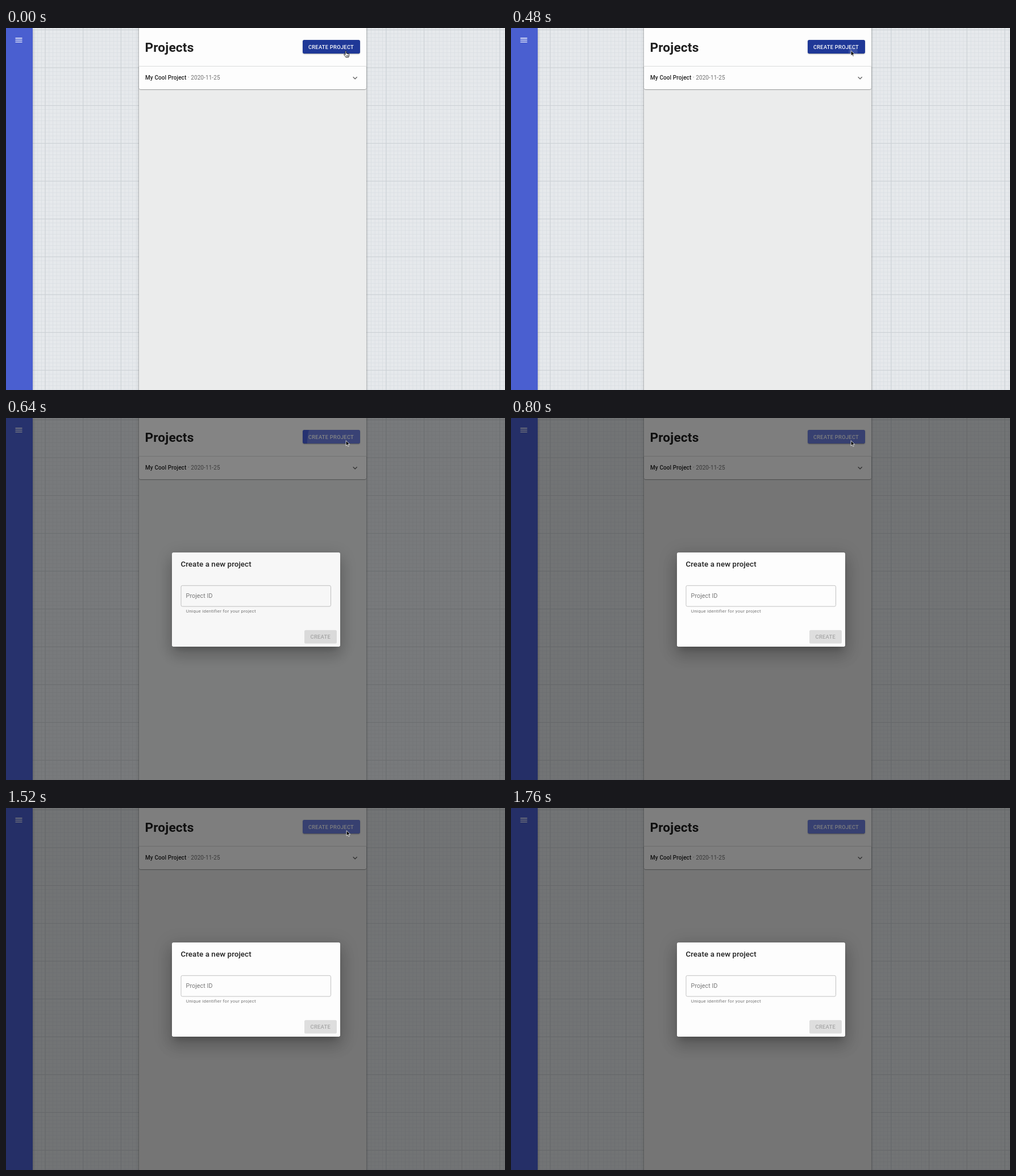
Recreate the animation shown at these times as an HTML page. Size 878 by 638 pixels, loop 2320 ms.

```html
<!DOCTYPE html>
<html lang="en">
<head>
<meta charset="utf-8">
<title>Create a project</title>
<style>
  html, body { margin: 0; width: 100%; height: 100%; overflow: hidden; }
  #stage {
    position: relative; width: 878px; height: 638px; overflow: hidden;
    background: #e6e9ec; font-family: Roboto, Arial, sans-serif;
  }
  #stage > *, #dialog > * { position: absolute; }
  svg { left: 0; top: 0; width: 878px; height: 638px; }
  text { white-space: pre; }
  .sidebar {
    left: 0; top: 0; width: 46.7px; height: 638px; background: #4a5fd0;
    box-shadow: 0 1.3px 2.7px -.7px #0003, 0 2.7px 3.3px #00000024, 0 .7px 6.7px #0000001f;
  }
  .panel {
    left: 234px; top: -4px; width: 399.5px; height: 650px; background: #ebecec;
    box-shadow: 0 1px 2px #0004, 0 1.3px 3px #00000024, 0 .7px 5.3px #0000001f;
  }
  .header, .row { left: 234px; width: 399.5px; background: #fdfdfd; }
  .header { top: 0; height: 67px; }
  .row {
    top: 67.5px; height: 40px; border-radius: 0 0 2.7px 2.7px;
    box-shadow: 0 1.3px .7px -.7px #0003, 0 .7px .7px #00000030, 0 .3px 2px #00000050;
  }
  #create {
    left: 521.5px; top: 21.3px; width: 101.3px; height: 24px; border-radius: 2.7px;
    box-shadow: 0 2px .7px -1.3px #0003, 0 1.3px 1.3px #00000024, 0 .7px 3.3px #0000001f;
  }
  #backdrop { inset: 0; background: #000; }
  #dialog { inset: 0; }
  .paper {
    left: 292px; top: 236.6px; width: 295.5px; height: 166.6px;
    border-radius: 2.7px; background: #fdfdfd;
    box-shadow: 0 7.3px 10px -4.7px #0003, 0 16px 25.3px 2px #00000024, 0 6px 30.7px 5.3px #0000001f;
  }
  .label { font-size: 10.67px; letter-spacing: .00938em; }
  .caps { font-size: 9.33px; font-weight: 500; letter-spacing: .02857em; }
</style>
</head>
<body>
<div id="stage">
  <svg>
    <defs>
      <pattern id="minor" x="2" y="3" width="6.667" height="6.667" patternUnits="userSpaceOnUse">
        <path d="M0 .35H6.667M.35 0V6.667" stroke="#d5dade" stroke-width=".7"/>
      </pattern>
      <pattern id="major" x="68.5" y="2.8" width="66.65" height="66.65" patternUnits="userSpaceOnUse">
        <path d="M0 .5H66.65M.5 0V66.65" stroke="#cbd0d4"/>
      </pattern>
    </defs>
    <rect width="878" height="638" fill="url(#minor)"/>
    <rect width="878" height="638" fill="url(#major)"/>
  </svg>
  <div class="sidebar"></div>
  <div class="panel"></div>
  <div class="header"></div>
  <div class="row"></div>
  <div id="create"></div>
  <svg>
    <clipPath id="buttonClip"><rect x="521.5" y="21.3" width="101.3" height="24" rx="2.7"/></clipPath>
    <g clip-path="url(#buttonClip)"><circle id="ripple" cx="602" cy="42" fill="#fff"/></g>
    <path transform="translate(14.5 13.3) scale(.6667)" fill="#fff"
      d="M3 18h18v-2H3zM3 13h18v-2H3zM3 8h18V6H3z"/>
    <text x="244.5" y="41.6" font-size="22.67" font-weight="700" letter-spacing=".17" fill="#1f1f1f">Projects</text>
    <text x="531.9" y="36.6" class="caps" fill="#fff">CREATE PROJECT</text>
    <text x="245" y="91.4" font-size="10" letter-spacing=".094" fill="#1f1f1f"><tspan font-weight="500">My Cool Project</tspan><tspan fill="#707070"> · 2020-11-25</tspan></text>
    <path transform="translate(606.2 80) scale(.6667)" fill="#666"
      d="M16.59 8.59 12 13.17 7.41 8.59 6 10l6 6 6-6z"/>
  </svg>
  <div id="backdrop"></div>
  <div id="dialog">
    <div class="paper"></div>
    <svg>
      <text x="307.4" y="262.3" font-size="13.33" font-weight="500" letter-spacing=".1" fill="#212121">Create a new project</text>
      <rect x="308" y="295.3" width="263.5" height="36.8" rx="2.5" fill="none" stroke="#c2c2c2"/>
      <text x="316.6" y="317.3" class="label" fill="#757575">Project ID</text>
      <text x="316.7" y="343.1" font-size="8" letter-spacing=".267" fill="#757575">Unique identifier for your project</text>
      <rect x="525" y="373.8" width="57" height="23.8" rx="2.7" fill="#dedede"/>
      <text x="535.6" y="389.1" class="caps" fill="#a6a6a6">CREATE</text>
    </svg>
  </div>
  <svg>
    <path id="hand" transform="translate(594 40)" fill="#fff" stroke="#111" stroke-width=".9" stroke-linejoin="round"
      d="M3 7V1.5Q3 .5 3.9.5T4.8 1.5V4.5Q5.5 3.9 6.3 4.8Q7.1 4.2 7.9 5.1Q9.6 4.8 9.6 6.5V8.3Q9.4 10 8.5 11.7H4Q3 9.8 .8 7.4Q.3 6.2 1.5 6.1T3 7.6M6.3 4.8V6.2M7.9 5.1V6.5M5 8.3V10.2M6.5 8.3V10.2M8 8.3V10.2"/>
    <path id="arrow" fill="#000" stroke="#fff" stroke-width=".8" stroke-linejoin="round"
      d="M0 0V9.2L2.1 7.2 3.5 10.4 5 9.8 3.6 6.6H6.5Z"/>
  </svg>
</div>
<script>
  const LOOP = 2320, STEP = 80, CLICK = 480, FADE = 225, NUDGE = 1520, LEAVE = 1760;
  const HOVER = [31, 56, 151], REST = [74, 98, 218];
  const el = id => document.getElementById(id);
  const clamp = v => Math.min(1, Math.max(0, v));
  const mix = (a, b, k) => a.map((v, i) => Math.round(v + (b[i] - v) * k));
  const show = (id, on) => el(id).setAttribute('visibility', on ? 'visible' : 'hidden');

  function render(t) {
    const pressed = t >= CLICK;
    const fade = 1 - (1 - clamp((t - CLICK) / FADE)) ** 2.6;

    el('create').style.background = `rgb(${mix(HOVER, REST, fade)})`;
    el('backdrop').style.opacity = fade * .5;
    el('dialog').style.opacity = fade;

    el('ripple').setAttribute('r', pressed ? Math.min(110, 8 + (t - CLICK) * .4) : 0);
    el('ripple').setAttribute('opacity', .12 + .08 * fade);

    show('hand', !pressed);
    show('arrow', pressed && t < LEAVE);
    el('arrow').setAttribute('transform', `translate(${t < NUDGE ? 598.2 : 599.2} 39.8)`);
  }

  const start = performance.now();
  function tick() {
    const t = (performance.now() - start) % LOOP;
    render(Math.floor(t / STEP) * STEP);
    requestAnimationFrame(tick);
  }
  tick();
</script>
</body>
</html>
```
